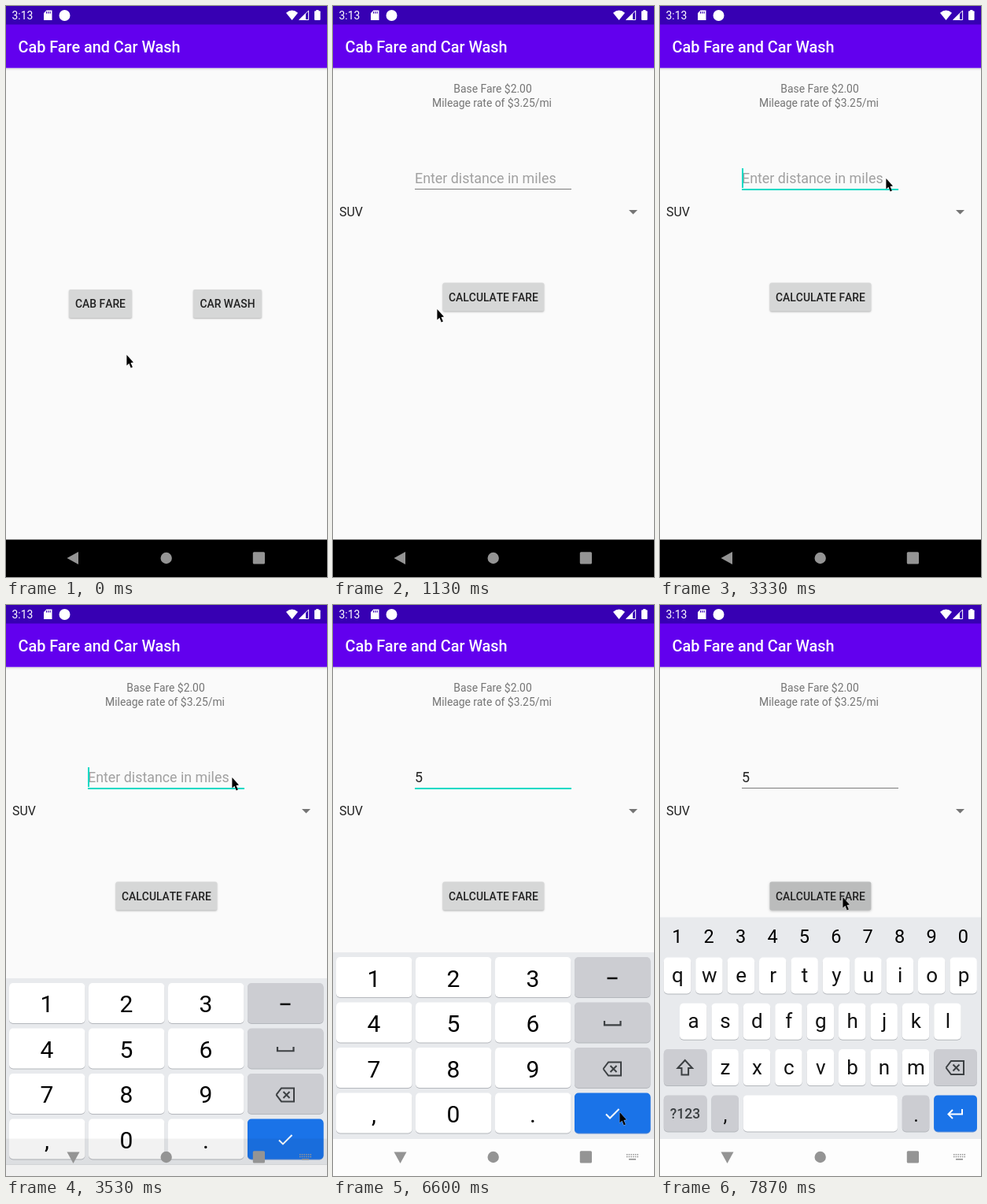
An HTML page with a canvas that plays this animation: 408x725 px, repeating every 8000 ms.

```html
<!DOCTYPE html>
<html lang="en">
<head>
<meta charset="utf-8">
<title>Cab Fare and Car Wash</title>
<style>
html, body { margin: 0; width: 100%; height: 100%; overflow: hidden; background: #000; }
canvas { display: block; width: 408px; height: 725px; }
</style>
</head>
<body>
<canvas id="stage"></canvas>
<script>
const W = 408, H = 725, LOOP = 8000, STEP = 1000 / 15, SP = 0.9917, NAV = 677.5;
const GREY = '#cccdd2', BLUE = '#1a73e8', INK = '#3c4043';
const FOCUS = 3195, TYPED = 4795, DONE = 6725;
const canvas = document.getElementById('stage');
const c = canvas.getContext('2d');
const dpr = window.devicePixelRatio || 1;
canvas.width = W * dpr;
canvas.height = H * dpr;

const clamp = v => Math.max(0, Math.min(1, v));
const smooth = p => p * p * (3 - 2 * p);
const progress = (t, start, length) => clamp((t - start) / length);

// y of a cubic-bezier(.4, 0, .2, 1) at progress x
function fastOutSlowIn(x) {
  let lo = 0, hi = 1;
  for (let i = 0; i < 24; i++) {
    const s = (lo + hi) / 2;
    const bx = 1.2 * s * (1 - s) ** 2 + 0.6 * s * s * (1 - s) + s ** 3;
    if (bx < x) lo = s; else hi = s;
  }
  return x <= 0 ? 0 : x >= 1 ? 1 : smooth(lo);
}

// each move ends at x, y and swings sideways by bend on its way
const moves = [
  { start: 0, end: 400, x: 133, y: 385, bend: 0 },
  { start: 1733, end: 2133, x: 187, y: 213, bend: 0 },
  { start: 2200, end: 3067, x: 288, y: 219, bend: 99 },
  { start: 4800, end: 6600, x: 365, y: 644, bend: 36 },
  { start: 6733, end: 7467, x: 233, y: 371, bend: 0 }
];
function pointerAt(t) {
  let x = 154, y = 443;
  for (const m of moves) {
    const e = smooth(progress(t, m.start, m.end - m.start) ** 1.5);
    x += (m.x - x) * e + m.bend * 6.75 * e * e * (1 - e);
    y += (m.y - y) * e;
  }
  return [x, y];
}

function rect(x, y, w, h, color) {
  c.fillStyle = color;
  c.fillRect(x, y, w, h);
}
function round(x, y, w, h, r, color) {
  c.beginPath();
  c.roundRect(x, y, w, h, r);
  c.fillStyle = color;
  c.fill();
}
function disc(x, y, r, color) {
  c.beginPath();
  c.arc(x, y, r, 0, 7);
  c.fillStyle = color;
  c.fill();
}
function trace(pts, closed) {
  c.beginPath();
  pts.forEach(p => c.lineTo(p[0], p[1]));
  if (closed) c.closePath();
}
function poly(color, ...pts) {
  trace(pts, true);
  c.fillStyle = color;
  c.fill();
}
function line(color, width, ...pts) {
  trace(pts, false);
  c.strokeStyle = color;
  c.lineWidth = width;
  c.stroke();
}
function text(str, x, y, size, color, align = 'left', weight = 400) {
  c.font = `${weight} ${size}px Roboto, sans-serif`;
  c.textAlign = align;
  c.fillStyle = color;
  c.fillText(str, x, y);
}
// runs fn with its own origin
function at(x, y, fn) {
  c.save();
  c.translate(x, y);
  fn();
  c.restore();
}

function button(label, x, y, w, press, hit) {
  const h = 36;
  c.save();
  c.shadowColor = 'rgba(0,0,0,.28)';
  c.shadowBlur = (2 + press) * dpr;
  c.shadowOffsetY = dpr;
  round(x, y, w, h, 2, '#d6d7d7');
  c.restore();
  c.save();
  if (press > 0) {
    c.beginPath();
    c.roundRect(x, y, w, h, 2);
    c.clip();
    disc(hit[0], hit[1], 20 + 130 * press, 'rgba(0,0,0,.127)');
  }
  c.fontKerning = 'none';
  text(label, x + w / 2, y + 23, 14 * SP, '#212121', 'center', 500);
  c.restore();
}

function frameBars() {
  rect(0, 0, W, H, '#fafafa');
  const g = c.createLinearGradient(0, 79, 0, 82);
  g.addColorStop(0, 'rgba(0,0,0,.12)');
  g.addColorStop(1, 'rgba(0,0,0,0)');
  rect(0, 79, W, 3, g);
  rect(0, 0, W, 24, '#3700b3');
  rect(0, 23.5, W, 55.2, '#6200ee');
  text('Cab Fare and Car Wash', 15.5, 59, 20 * SP, '#fff', 'left', 500);
  rect(0, NAV, W, H - NAV, '#000');
}

function homePage(t) {
  frameBars();
  button('CAB FARE', 80, 360, 80, progress(t, 533, 200), [133, 385]);
  button('CAR WASH', 238, 360, 87, 0);
}

function farePage(t) {
  frameBars();
  text('Base Fare $2.00', 203, 109.7, 14 * SP, '#757575', 'center');
  text('Mileage rate of $3.25/mi', 202, 128.4, 14 * SP, '#757575', 'center');

  const typed = t >= TYPED, focused = t >= FOCUS && t < DONE;
  if (typed) text('5', 104, 225, 18 * SP, '#212121');
  else text('Enter distance in miles', 104, 225, 18 * SP, '#a0a0a0');
  if (focused) rect(104, 232, 199, 2, '#03dac5');
  else rect(104, 232, 199, 1, '#7c7c7c');
  const blink = t - (typed ? TYPED : FOCUS + 100);
  if (focused && blink >= 0 && blink % 1000 < 500) rect(typed ? 114 : 104, 206, 2, 25, '#03dac5');

  text('SUV', 8, 267, 16 * SP, '#212121');
  poly('#757575', [376, 259], [387, 259], [381.5, 264.5]);
  button('CALCULATE FARE', 139.6, 351.6, 128.6, progress(t, 7667, 200), [233, 371]);
}

function statusIcons() {
  text('3:13', 7.5, 17, 14 * SP, '#fff');
  poly('#fff', [51.5, 5.5], [58.5, 5.5], [58.5, 18], [48, 18], [48, 9]);
  for (let i = 0; i < 3; i++) rect(51 + i * 2.3, 7, 1.1, 2.6, '#3700b3');
  disc(74.5, 12, 7, '#fff');
  c.beginPath();
  c.moveTo(356, 8.8);
  c.quadraticCurveTo(363.5, 2.2, 371, 8.8);
  c.lineTo(363.5, 18);
  c.fillStyle = '#fff';
  c.fill();
  poly('#fff', [381, 9.2], [381, 18], [372.5, 18]);
  line('#fff', 1, [372.7, 17.5], [384.6, 17.5], [384.6, 6], [372.7, 17.5]);
  round(392, 6.3, 7.6, 11.7, 1, '#fff');
  rect(394.2, 5, 3.2, 2, '#fff');
}

function navIcons(open) {
  const color = '#949494';
  at(85.5, 701, () => {
    if (open) c.rotate(-Math.PI / 2);
    poly(color, [-8, 0], [6.5, -8], [6.5, 8]);
  });
  disc(203.7, 701, 7.2, color);
  round(313.8, 693.3, 15.2, 15.2, 1.5, color);
  if (!open) return;
  for (let i = 0; i < 12; i++)
    rect(373 + i % 6 * 2.7, 697 + (i > 5 ? 2.8 : 0), 1.5, 1.5, color);
  rect(376, 703, 9, 1.6, color);
}

function key(x, y, w, h, color) {
  round(x, y + 1, w, h, 5, color === BLUE ? '#5f8fd6' : '#b4b7bc');
  round(x, y, w, h, 5, color);
}

function backspace(x, y) {
  at(x, y, () => {
    line(INK, 2, [-11.5, 0], [-5, -8.5], [11, -8.5], [11, 8.5], [-5, 8.5], [-11.5, 0]);
    for (const s of [-4, 4]) line(INK, 2, [-2.5, s], [5.5, -s]);
  });
}

function numberPad(pressed) {
  rect(0, 441, W, 237, '#e8eaed');
  const glyphs = '123-456 789<,0.>';
  [...glyphs].forEach((ch, i) => {
    const col = i % 4, x = 4 + col * 101, y = 447 + (i >> 2) * 57.5;
    key(x, y, 96.5, 51, col < 3 ? '#fff' : ch === '>' ? BLUE : GREY);
    if (col < 3) text(ch, x + 48, y + 37.5, 30, '#000', 'center');
    else if (ch === '>' && pressed) round(x, y, 96.5, 51, 5, 'rgba(0,0,0,.12)');
  });
  rect(348.5, 472.7, 13, 2.5, '#111');
  line(INK, 2.2, [345, 528], [345, 533.3], [365.5, 533.3], [365.5, 528]);
  backspace(355, 589);
  line('#fff', 2, [347, 646.5], [352, 651.5], [363.5, 640]);
}

function letterPad() {
  const pitch = 40.4;
  // a key placed on the letter grid, with its label
  function cell(col, row, span, color, label = '', size = 26, drop = 31.5) {
    const x = 4.8 + col * pitch, y = 447.5 + row * 58.3, w = span * pitch - 5.9;
    key(x, y, w, 46, color);
    text(label, x + w / 2 + 0.4, y + drop, size, '#111', 'center');
  }
  rect(0, 396.5, W, 281.5, '#e8eaed');
  [...'1234567890'].forEach((d, i) => text(d, 21.8 + i * pitch, 429, 23.5, '#000', 'center'));
  ['qwertyuiop', 'asdfghjkl', 'zxcvbnm'].forEach((letters, row) => {
    const first = row * (row + 1) / 4;
    [...letters].forEach((ch, i) => cell(first + i, row, 1, '#fff', ch));
  });
  for (const row of [2, 3]) {
    cell(0, row, 1.5, GREY);
    cell(8.5, row, 1.5, row === 3 ? BLUE : GREY);
  }
  cell(1.5, 3, 1, GREY, ',', 25, 33.5);
  cell(2.5, 3, 5, '#fff');
  cell(7.5, 3, 1, GREY, '.', 25, 33.5);
  text('?123', 32, 652, 17.5, INK, 'center', 500);
  at(31.8, 588, () => line(INK, 2, [0, -10], [-9.3, 0], [-4.3, 0], [-4.3, 8.5],
    [4.3, 8.5], [4.3, 0], [9.3, 0], [0, -10], [-9.3, 0]));
  backspace(375, 587.5);
  line('#fff', 2, [384, 640], [384, 646.5], [367, 646.5]);
  line('#fff', 2, [372, 641], [366.5, 646.5], [372, 652]);
}

function keyboard(t) {
  const p = progress(t, 3430, 370);
  c.save();
  c.globalAlpha = progress(t, 3430, 80);
  c.translate(0, 88 * (1 - p) ** 3);
  rect(0, 678, W, 47, '#fdfdfd');
  if (t < DONE + 135) numberPad(t > DONE - 65 && t < DONE + 65);
  else letterPad();
  c.restore();
  rect(0, NAV, W, H - NAV, `rgba(0,0,0,${0.07 * (1 - p)})`);
}

function pointer(x, y) {
  at(x - 0.6, y, () => {
    trace([[0, 0], [0, 13.4], [3, 10.8], [5.3, 16.6], [7.5, 15.6], [5.1, 10.1], [8.6, 9.6]], true);
    c.lineJoin = 'round';
    c.strokeStyle = 'rgba(255,255,255,.5)';
    c.lineWidth = 1;
    c.stroke();
    c.fillStyle = '#000';
    c.fill();
  });
}

function draw(t) {
  c.setTransform(dpr, 0, 0, dpr, 0, 0);
  const e = fastOutSlowIn(progress(t, 700, 425));
  rect(0, 0, W, H, '#000');
  if (e < 1) {
    at(0, -14 * e, () => homePage(t));
    rect(0, 0, W, H, `rgba(0,0,0,${0.1 * e})`);
  }
  if (e > 0) {
    const top = H * 0.96 * (1 - e);
    c.save();
    c.beginPath();
    c.rect(0, top, W, H - top);
    c.clip();
    at(0, 16 * (1 - e), () => farePage(t));
    c.restore();
  }
  const open = t > 3430;
  if (open) keyboard(t);
  statusIcons();
  navIcons(open);
  pointer(...pointerAt(t));
}

// the screen refreshes fifteen times a second
const begin = performance.now();
function tick(now) {
  const t = Math.max(0, now - begin) % LOOP;
  draw(Math.floor((t + 5) / STEP) % 120 * STEP);
  requestAnimationFrame(tick);
}
draw(0);
requestAnimationFrame(tick);
</script>
</body>
</html>
```
